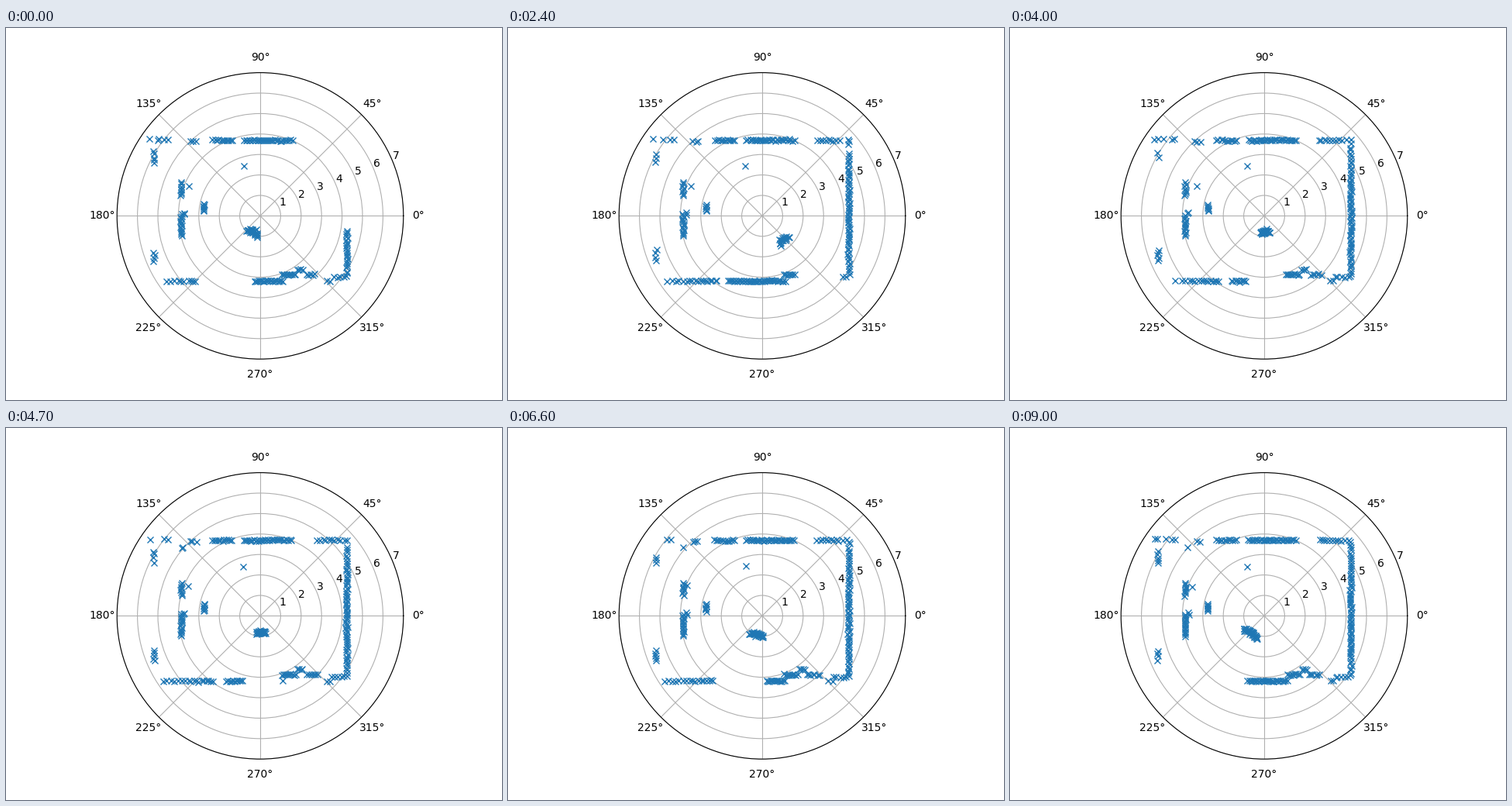
These frames come from a looping animation (640 by 480 pixels, 9100 ms). A matplotlib script:

```python
import numpy as np
import matplotlib.pyplot as plt
from matplotlib.animation import FuncAnimation

FRAMES, INTERVAL = 91, 100
STEP = 1.2      # degrees between rays

# Room plan in metres, sensor at the origin: fixed coordinate, (from, to) spans
ACROSS = [      # y, spans of x
    (3.70, [(2.65, 4.25), (-0.82, 1.62), (-2.42, -1.33)]),
    (3.74, [(-5.55, -4.33)]),
    (3.64, [(-3.42, -3.12)]),
    (3.36, [(-3.90, -3.75)]),
    (-2.62, [(1.80, 2.10)]),
    (-2.87, [(1.05, 1.78), (2.20, 2.80)]),
    (-2.98, [(3.48, 4.18)]),
    (-3.18, [(-4.75, -2.20), (-1.70, 1.12), (3.22, 3.45)]),
]
UPRIGHT = [     # x, spans of y
    (4.23, [(-2.97, 3.72)]),
    (-2.75, [(0.22, 0.60)]),
    (-3.70, [(0.05, 0.22)]),
    (-3.86, [(-1.04, 0.10), (0.95, 1.65)]),
    (-5.20, [(-2.25, -1.65), (2.55, 3.15)]),
]
POST = (-0.83, 2.43)

# Walking person: seconds, bearing, angular width, distance
WALK = np.array([
    (0.0, 245, 39, 0.85),
    (1.4, 303, 26, 1.13),
    (2.4, 311, 23, 1.50),
    (4.0, 272, 34, 0.78),
    (5.5, 272, 34, 0.78),
    (7.7, 235, 46, 1.02),
    (9.0, 233, 43, 1.02),
])


def hits(along, level, span):
    """Which rays, with unit parts (fixed, free) = along, meet a wall, and how far."""
    fixed, free = along
    dist = level / np.where(np.abs(fixed) < 1e-9, 1e-9, fixed)
    spot = dist * free
    return (dist > 0) & (spot > span[0]) & (spot < span[1]), dist


def scan(frame):
    """One sweep: bearings in radians and ranges in metres."""
    rng = np.random.default_rng(700 + frame)
    t = frame * INTERVAL / 1000
    rays = np.arange(0, 360, STEP) + rng.uniform(-.2, .2)
    rays = (rays + rng.normal(0, .2, rays.size)) % 360
    c, s = np.cos(np.radians(rays)), np.sin(np.radians(rays))

    bearings, ranges = [], []
    for along, walls in (((s, c), ACROSS), ((c, s), UPRIGHT)):
        for level, spans in walls:
            for span in spans:
                hit, dist = hits(along, level, span)
                bearings.append(rays[hit])
                ranges.append(dist[hit])

    # The post and a wandering reflection beside the left shelf
    dots = np.array([POST, (rng.uniform(-3.7, -3.3), 1.45)])
    dots += rng.normal(0, .02, dots.shape)
    bearings.append(np.degrees(np.arctan2(dots[:, 1], dots[:, 0])) % 360)
    ranges.append(np.hypot(dots[:, 0], dots[:, 1]))

    ang, dist = np.concatenate(bearings), np.concatenate(ranges)
    dist = dist * rng.normal(1, .005, dist.size)
    lost = (dist > 5.2) & (rng.random(dist.size) < .15)

    # The person hides whatever stands behind
    mid, width, near = (np.interp(t, WALK[:, 0], col) for col in WALK.T[1:])
    seen = (np.abs(ang - mid) > width / 2) & ~lost
    u = (rays - mid) / (width / 2)
    body = np.abs(u) < .95
    skin = near * (1 + .15 * u[body] ** 2) + rng.normal(0, .05, body.sum())
    ang = np.append(ang[seen], rays[body])
    dist = np.append(dist[seen], skin)

    if frame == 0:      # the first sweep is incomplete
        swept = (ang > 65.5) & (ang < 350.5)
        ang, dist = ang[swept], dist[swept]
    return np.radians(ang), dist


fig = plt.figure(figsize=(6.4, 4.8), dpi=100)
ax = fig.add_subplot(projection="polar")
ax.set_ylim(0, 7)
ax.set_rticks(range(1, 8))
ax.tick_params(axis="x", pad=3.4)
points, = ax.plot([], [], "x", color="C0")


def update(frame):
    points.set_data(*scan(frame))
    return points,


anim = FuncAnimation(fig, update, frames=FRAMES, interval=INTERVAL,
                     repeat=True, repeat_delay=0)
plt.show()
```
